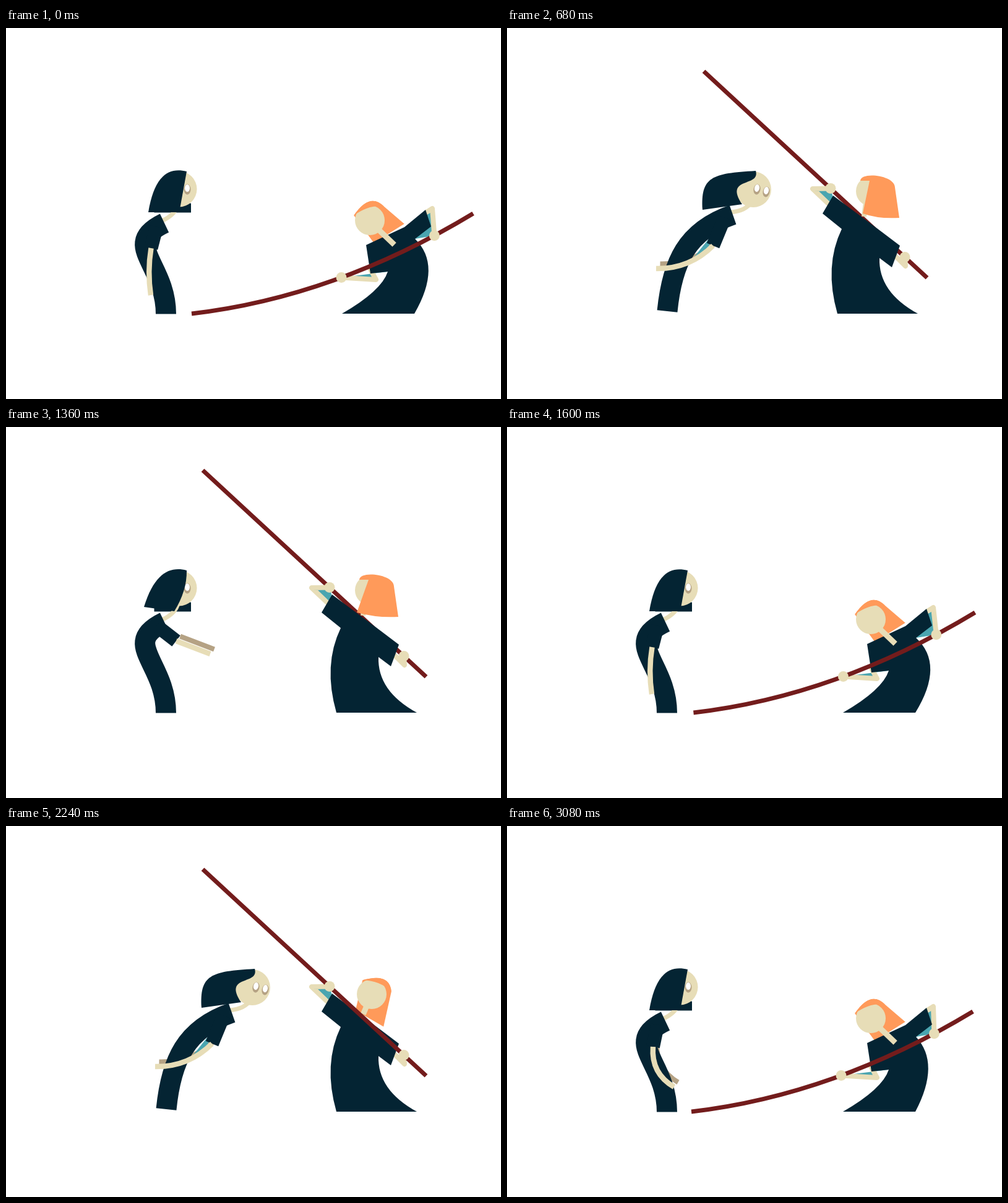
An HTML page with a canvas that plays this animation: 800 px wide and 600 px high, repeating every 3120 ms.

```html
<!DOCTYPE html>
<html lang="en">
<head>
<meta charset="utf-8">
<title>Staff strike</title>
<style>
  html, body { margin: 0; width: 100%; height: 100%; overflow: hidden; background: #fff; }
  canvas { display: block; }
</style>
</head>
<body>
<canvas id="stage" width="800" height="600"></canvas>
<script>
const ctx = document.getElementById('stage').getContext('2d');
const LOOP = 3120, SWING = 1560, STEP = 40, FLOOR = 462;
const NAVY = '#042433', CREAM = '#e7ddb7', TAN = '#b5a284', TEAL = '#4aa5b0';
const ORANGE = '#ff9a5a', RED = '#ff3300', WOOD = '#731c1c';

const clamp = x => Math.max(0, Math.min(1, x));
const ease = x => x * x * (3 - 2 * x);
const ramp = (t, from, to) => clamp((t - from) / (to - from));
const glide = (t, from, to) => ease(ramp(t, from, to));
const lerp = (a, b, k) => a + (b - a) * k;
const mix = (a, b, k) => a.map((v, i) => lerp(v, b[i], k));
const mixPose = (a, b, k) => Object.fromEntries(Object.keys(a).map(n => [n, mix(a[n], b[n], k)]));
const polar = ([x, y], r, deg) => [x + r * Math.cos(deg * Math.PI / 180), y + r * Math.sin(deg * Math.PI / 180)];

// Pose at time t from a list of [time, pose]
function sample(keys, t, blend) {
  let i = 0;
  while (i < keys.length - 2 && t >= keys[i + 1][0]) i++;
  const [t0, a] = keys[i], [t1, b] = keys[i + 1];
  return blend(a, b, glide(t, t0, t1));
}

// Quadratic curve between two points, pushed sideways by `bend`
function bow([x0, y0, x1, y1, bend]) {
  const dx = x1 - x0, dy = y1 - y0, len = Math.hypot(dx, dy);
  return [x0, y0, (x0 + x1) / 2 + dy / len * bend, (y0 + y1) / 2 - dx / len * bend, x1, y1];
}

// First part of a quadratic curve, up to k
function part([a, b, c, d, e, f], k) {
  const mid = mix([a, b], [c, d], k);
  return [a, b, ...mid, ...mix(mid, mix([c, d], [e, f], k), k)];
}

// Build a path from command letters and a flat list of coordinates
const METHODS = { M: ['moveTo', 2], L: ['lineTo', 2], Q: ['quadraticCurveTo', 4], C: ['bezierCurveTo', 6] };
function trace(commands, p) {
  let i = 0;
  ctx.beginPath();
  for (const c of commands) {
    const [method, n] = METHODS[c];
    ctx[method](...p.slice(i, i += n));
  }
}
function fill(color, commands, p) {
  trace(commands, p);
  ctx.fillStyle = color;
  ctx.fill();
}
function line(color, width, commands, p, cap = 'butt') {
  trace(commands, p);
  ctx.strokeStyle = color;
  ctx.lineWidth = width;
  ctx.lineCap = cap;
  ctx.lineJoin = 'round';
  ctx.stroke();
}
function oval(color, x, y, rx, ry = rx, turn = 0) {
  ctx.beginPath();
  ctx.ellipse(x, y, rx, ry, turn, 0, 7);
  ctx.fillStyle = color;
  ctx.fill();
}

// ---- Girl: head centre, two eye offsets with tilt, spine curve, hair outline ----
const upright = (backX, backY, frontX, bulge) => ({
  head: [279.5, 260.5], eyes: [13.5, -1.5, 38, -1, 0],
  spine: [258.5, 462.5, 258.5, 380, 184, 350, 256, 315.5],
  hair: [backX, backY, 240, 236, 265, 225, 292, 232,
    lerp(292, frontX, 1 / 3) + bulge, 254, lerp(292, frontX, 2 / 3) + bulge, 276, frontX, 298]
});
const still = upright(230, 298, 280, 0);
const hairAhead = upright(238, 298, 338, 0);
const hairBehind = upright(223, 291, 272, 7);
const thrown = {
  head: [60, 251], eyes: [-14, -2, -3, -18, -0.4],
  spine: [258.5, 461.5, 250, 369, 198, 338, 117, 295],
  hair: [139, 241, 20, 215, -20, 274, 103, 315, 125, 275, 137, 256, 127, 256]
};
const lean = {
  head: [398, 261], eyes: [6, -2, 21, 2, 0.2],
  spine: [259, 458, 267, 379, 290, 328, 365, 302],
  hair: [316, 294, 313, 241, 330, 235, 402, 231, 410, 258, 350, 240, 380, 285]
};
const girlKeys = [
  [0, still], [220, still], [300, thrown], [320, thrown], [480, mixPose(still, thrown, 1.1)],
  [560, mixPose(still, thrown, 1.07)], [680, lean], [960, hairAhead], [1040, hairAhead],
  [1280, mixPose(hairAhead, hairBehind, 1.15)], [1360, hairBehind], [1500, still], [SWING, still]
];

// cuff, hand, bend
const hanging = [234.5, 356, 234, 432, -6];
const flung = [147, 298, 244, 358, 11];
const armKeys = [
  [0, hanging], [220, hanging], [300, flung], [560, flung],
  [680, [333, 352, 241, 389, 21]], [1000, [232, 335, 134, 361, 0]],
  [1090, [230, 333, 124, 350, 0]], [1220, [236, 357, 234, 435, 0]],
  [1360, [275, 346, 330, 367, 0]], [1520, [236, 357, 270, 422, -23]], [SWING, hanging]
];

function drawFace(x, y, [x1, y1, x2, y2, tilt]) {
  oval(CREAM, x, y, 29);
  ctx.save();
  ctx.clip();
  for (const [ex, ey] of [[x2, y2], [x1, y1]]) {
    oval(TAN, x + ex, y + ey + 2, 5.5, 8.5, tilt);
    oval('#fff', x + ex, y + ey, 4, 6, tilt);
  }
  ctx.restore();
}

function drawGirl(u) {
  const { head, eyes, spine, hair } = sample(girlKeys, u, mixPose);
  const arm = sample(armKeys, u, mix);
  const hop = -20 * Math.sin(Math.PI * ramp(u, 680, 960));
  const lift = (p, k) => p.map((v, i) => i % 2 ? v + hop * k : v);
  const [x, y] = lift(head, 1);
  const back = [...spine.slice(0, 4), ...lift(spine.slice(4), 0.6)];
  const tip = back.slice(6);
  const shoulder = mix(tip, back.slice(4, 6), 14 / Math.hypot(back[4] - tip[0], back[5] - tip[1]));
  const flipped = x < 150;
  const drawHair = () => fill(NAVY, 'MCC', lift(hair, 1));

  const reach = bow(arm);
  line(TAN, 8, 'MQ', reach.map((v, i) => i % 2 ? v - 7.5 : v + 6.5));
  if (flipped) {
    drawHair();
    line(CREAM, 7, 'ML', [tip[0] + 6, tip[1] - 6, x, y]);
  } else {
    if (x < 300) {
      ctx.fillStyle = NAVY;
      ctx.fillRect(x - 40, y + 23, 59.5, 15);
    }
    line(CREAM, 7, 'MQ', [tip[0] - 3, tip[1] - 4, (tip[0] + x) / 2 + 5, (tip[1] + y) / 2 + 14, lerp(tip[0], x, .9), lerp(tip[1], y, .5)]);
  }
  drawFace(x, y, eyes);
  if (u >= 640 && u <= 720) fill(TEAL, 'MLL', [302, 371, 330, 336, 326, 355]);
  line(NAVY, 33, 'MC', back);
  if (!flipped) drawHair();
  line(NAVY, 22, 'ML', [...shoulder, ...arm.slice(0, 2)]);
  line(CREAM, 8.5, 'MQ', reach);
}

// ---- Woman ----
// robe: left cuff, left armpit, hem curve, right armpit, right cuff, shoulder
const low = {
  robe: [582, 351, 589, 397, 617, 394, 607, 425, 543, FLOOR, 660, FLOOR, 705, 384, 661, 341, 687, 321, 678, 294, 644, 322],
  staff: [300, 462, 532, 435, 755, 300], elbows: [598, 407, 689, 292], face: [588, 311]
};
const raised = {
  robe: [527, 271, 510, 300, 541, 325, 512, 385, 534, FLOOR, 664, FLOOR, 600, 427, 602, 372, 622, 387, 635, 352, 606, 330],
  staff: [318, 70, 499, 237, 679, 404], elbows: [644, 385], face: [591, 272]
};
raised.elbows = [494, 260, ...raised.elbows];

function drawArm(pit, cuff, elbow, hand) {
  fill(TEAL, 'MLLL', [...pit, ...cuff, ...elbow, ...hand]);
  line(CREAM, 8, 'MLL', [...cuff, ...elbow, ...hand], 'round');
}

// Hair seen from the front hangs around the face and turns with the head
function drawFrontHead(face, w, whip) {
  const at = (r, deg, turn) => polar(face, r, deg + turn * w);
  const bang = at(27, 197, 40), crown = at(46, 270, 40), temple = at(32, 316, 37);
  const hemL = at(37, 80, 55 + 30 * whip);
  fill(ORANGE, 'MQLL', [...bang, ...crown, ...temple, ...at(56, 6, 64), ...hemL]);
  oval(CREAM, ...face, 24);
  fill(ORANGE, 'MQQ', [...bang, ...crown, ...temple, ...at(26, 270, 32), ...bang]);
}

function drawBackHead(face, u) {
  const flick = 6 * Math.sin(Math.PI * ramp(u, 680, 1100)), sway = 8 * glide(u, 680, 1360);
  ctx.save();
  ctx.translate(face[0] - raised.face[0], face[1] - raised.face[1]);
  oval(CREAM, 588, 264, 24);
  line(CREAM, 8, 'ML', [580, 282, 577, 305]);
  fill(ORANGE, 'MLCLQ', [586, 247, 571, 247, 572, 232, 627, 238, 627, 258, 634 + flick, 307, 600, 309, 575 - sway, 300]);
  ctx.restore();
}

function drawWoman(t, u, drawFan) {
  const w = u < 800 ? glide(u, 200, 270) : 1 - glide(u, 1380, 1500);
  const drift = (1 - w) * (u > 800 ? -2 : 6 * ramp(u, 0, 170));
  const { robe, staff, elbows, face } = mixPose(low, raised, w);
  const turned = t < SWING && w > 0.5;
  const pole = staff.map((v, i) => i % 2 ? v : v + drift);
  const hands = [.527, .86].map(k => part(pole, k + .04 * w).slice(4));
  const point = i => robe.slice(2 * i, 2 * i + 2);
  const drawPole = () => line(WOOD, 7, 'MQ', pole);
  robe[12] += 2 * drift;

  if (turned) drawPole();
  drawArm(point(2), mix(point(0), point(1), .8 - .35 * w), elbows.slice(0, 2), hands[0]);
  drawArm(point(7), mix(point(9), point(8), .15 + .35 * w), elbows.slice(2), hands[1]);
  if (!turned) drawFrontHead(face, w, u < 800 ? w * (1 - glide(u, 320, 520)) : 0);
  fill(NAVY, 'MLLQLQLLL', robe);
  if (turned) drawBackHead(face, u);
  else line(CREAM, 9, 'ML', [...polar(face, 22, 47 + 66 * w), ...polar(face, lerp(56, 35, w), 45 + 68 * w)]);
  drawFan();
  if (!turned) drawPole();
  for (const hand of hands) oval(CREAM, ...hand, 8.5);
}

// ---- Motion trails ----
const fan = [318, 70, 274, 180, 222, 300, 356, FLOOR, 587, FLOOR, 528, 270];
const wake = [388, 490, 310, 330, 205, 259, 85, 252];
// tip, tail, bend
const lashes = [[165, 91, 284, 273, 20], [107, 159, 272, 284, 28], [323, 73, 288, 165, -8.6]];

// Fold a list of points onto the raised staff
function fold(p, k) {
  const [x0, y0, , , x1, y1] = raised.staff;
  const dx = x1 - x0, dy = y1 - y0, out = [];
  for (let i = 0; i < p.length; i += 2) {
    const s = ((p[i] - x0) * dx + (p[i + 1] - y0) * dy) / (dx * dx + dy * dy);
    out.push(lerp(p[i], x0 + s * dx, k), lerp(p[i + 1], y0 + s * dy, k));
  }
  return out;
}

function veil(paint) {
  ctx.globalAlpha = 0.65;
  paint();
  ctx.globalAlpha = 1;
}

function drawWake(width) {
  ctx.save();
  ctx.beginPath();
  ctx.rect(0, 0, 800, FLOOR - 1);
  ctx.clip();
  line(TEAL, width, 'MC', wake);
  veil(() => line(CREAM, width, 'MC', wake));
  ctx.restore();
}

function drawLashes(u) {
  const out = 0.15 * glide(u, 320, 520), keep = lerp(1, 0.3, ramp(u, 340, 560));
  for (const [x0, y0, x1, y1, bend] of lashes) {
    const dx = (x0 - x1) * out, dy = (y0 - y1) * out;
    line(RED, 12, 'MQ', part(bow([x0 + dx, y0 + dy, x1 + dx, y1 + dy, bend]), keep), 'round');
  }
}

function draw(t) {
  const u = t % SWING;
  const struck = u >= 280 && u <= 560;
  const shut = glide(u, 340, 480);
  const trails = struck && shut < 1;
  const sweep = fold(fan, shut);
  ctx.fillStyle = '#fff';
  ctx.fillRect(0, 0, 800, 600);
  if (trails) {
    fill(TEAL, 'MCLL', sweep);
    drawWake(46 * (1 - shut));
  }
  drawGirl(u);
  if (struck) drawLashes(u);
  drawWoman(t, u, () => trails && veil(() => fill(ORANGE, 'MCLL', sweep)));
}

function tick() {
  draw(Math.floor(performance.now() % LOOP / STEP) * STEP);
  requestAnimationFrame(tick);
}
tick();
</script>
</body>
</html>
```
